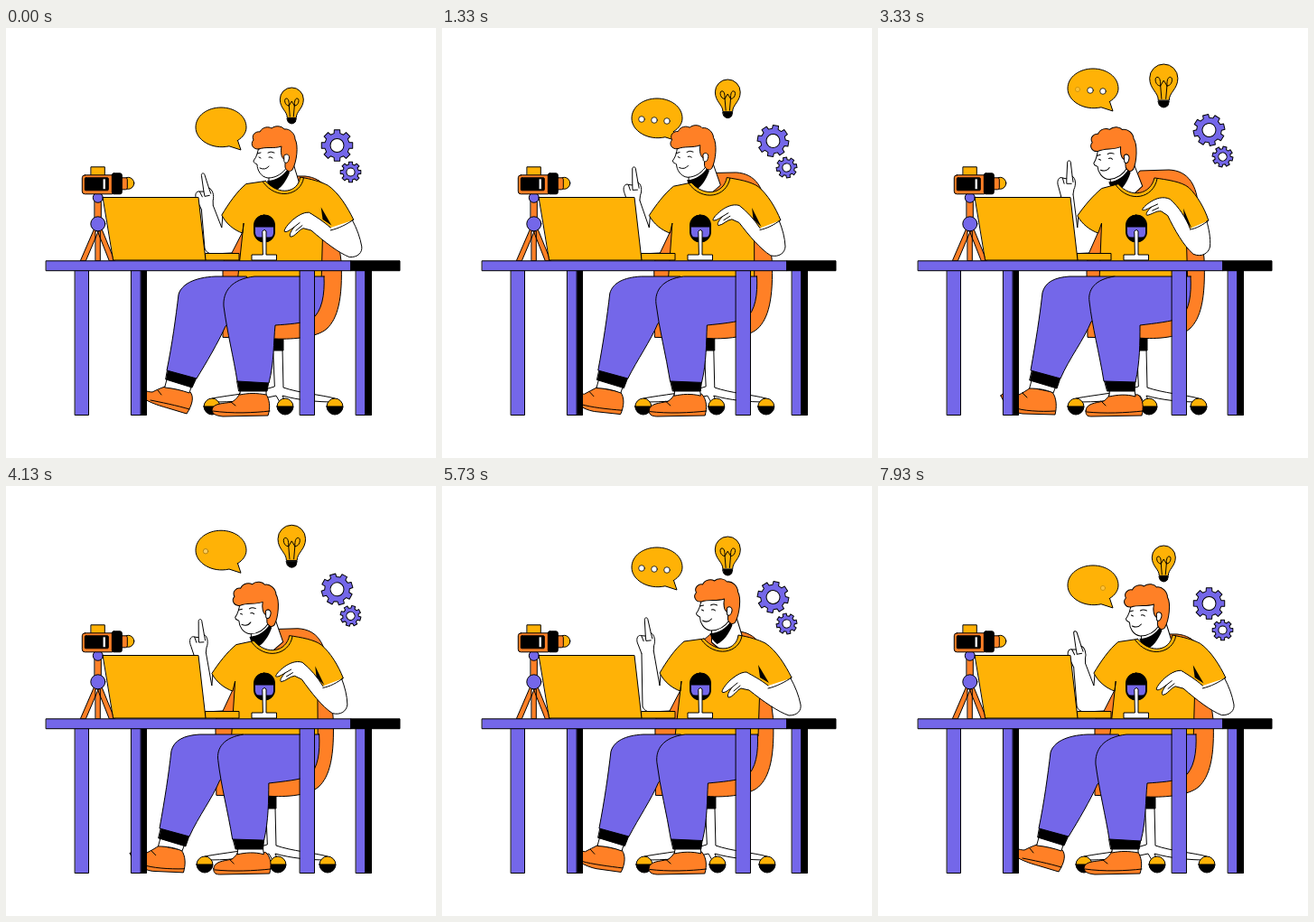
These frames come from a looping animation (476x476 px, 8.01 s). An HTML page:

```html
<!DOCTYPE html>
<html lang="en">
<head>
<meta charset="utf-8">
<title>Desk talk</title>
<style>
  html, body { margin: 0; width: 100%; height: 100%; overflow: hidden; background: #fff; }
  svg { display: block; width: 100vw; height: 100vh; }
  svg * { vector-effect: non-scaling-stroke; }
  .ink { stroke: #000; stroke-width: 1; stroke-linejoin: round; stroke-linecap: round; }
  .line { fill: none; }
  .purple { fill: #7467e9; }
  .orange { fill: #ff8026; }
  .yellow { fill: #ffb206; }
  .white { fill: #fff; }
  .black { fill: #000; }
  .dot { stroke-width: .8; }
</style>
</head>
<body>
<svg viewBox="0 0 476 476">
  <!-- floating icons -->
  <g id="bulb" class="ink">
    <path class="yellow" d="M-5 33 C-5 26 -13 23 -13 13 A13 13 0 0 1 13 13 C13 23 5 26 5 33Z"/>
    <path class="line" d="M-2 32 L-3 20 C-8 20 -9 12 -6 12 C-3 12 -3 17 -3 20 M2 32 L3 20 C8 20 9 12 6 12 C3 12 3 17 3 20 M-3 20 L0 15 L3 20"/>
    <path class="black" d="M-5 34 H5 L4 38 Q0 42 -4 38Z"/>
  </g>
  <g id="bubble" class="ink">
    <path class="yellow" d="M18.5 14.5 L22 25 L9 20.8 C-10 25 -28 14 -28 0 C-28 -13 -15 -22 0 -22 C15 -22 28 -13 28 0 C28 6 24 11 18.5 14.5Z"/>
    <circle class="white dot" cx="-17" cy="1" r="3.3"/>
    <circle class="white dot" cx="-3" cy="2" r="3.3"/>
    <circle class="white dot" cx="11" cy="3" r="3.3"/>
  </g>
  <g id="gearBig" class="ink"><path class="purple"/><circle class="white" r="7.5"/></g>
  <g id="gearSmall" class="ink"><path class="purple"/><circle class="white" r="4.6"/></g>

  <!-- chair -->
  <g id="chairBase" class="ink">
    <path class="white" d="M287 355 H297 L298 398 C315 404 340 406 355 410 V414 C335 414 315 412 297 407 L300 414 H294 L290 407 C265 413 240 414 219 414 V410 C240 406 268 404 288 397Z"/>
    <path class="black" d="M288 338 H298 V357 H288Z"/>
    <g id="wheels"></g>
  </g>
  <path class="ink orange" data-by="chair"
    data-a="M232 342 L231 270 C231 250 238 225 246 205 C252 188 276 176 290 158 L322 157 C344 158 353 174 355 200 L361 255 C363 300 357 322 345 333 C335 342 310 345 288 343Z"
    data-b="M240 342 L240 270 C240 255 247 232 256 212 C262 194 288 180 308 164 L331 164 C352 166 362 182 364 205 L371 258 C373 300 367 322 355 333 C345 342 320 345 298 344Z"/>

  <!-- person -->
  <g id="neck">
    <path class="ink white" d="M291 155 V179 L306 192 L326 176 L318 150Z"/>
    <path class="black" d="M289 169 C299 169 307 163 312 156 L314 160 C310 170 304 178 297 181 C293 178 290 174 289 169Z"/>
  </g>
  <path id="arm" class="ink white"/>
  <g id="hand" class="ink white">
    <path d="M5 40 L6 34 C9 28 8 20 4 18 L2 1 C2 -2 -2 -2 -2 1 L-3 21 L-8 20 C-12 18 -16 23 -13 31 L-10 42"/>
    <path class="line" d="M-8 20 L-6 27 M-3 21 V27 L3 27 M4 18 L5 25"/>
  </g>
  <path class="ink yellow" data-by="lean"
    data-a="M264 173 L246 178 C236 186 226 198 219 208 C224 217 233 224 242 227 L246 216 L244 277 L342 277 L340 218 L345 224 C352 222 358 218 364 213 C360 200 352 186 343 177 C335 170 318 168 304 166 C300 184 278 190 264 173Z"
    data-b="M290 169 L268 172 C258 180 248 195 241 207 C246 217 255 224 264 227 L265 216 L258 277 L350 277 L352 218 L361 224 C370 222 380 217 387 212 C380 198 370 182 358 174 C350 170 340 167 328 165 C326 182 305 186 290 169Z"/>
  <path class="ink line" data-by="lean"
    data-a="M261 174 C276 195 303 189 307 167"
    data-b="M287 170 C302 191 329 185 332 166"/>
  <path class="black" data-by="lean"
    data-a="M337 200 L346 222 L338 212Z"
    data-b="M350 198 L362 218 L352 212Z"/>
  <g class="ink white">
    <path data-by="lean"
      data-a="M344 222 C340 210 332 197 322 188 C314 184 306 187 301 190 C296 193 292 196 291 199 C293 200 297 198 301 196 C298 199 294 203 296 205 C302 204 306 200 312 201 L319 206 C326 222 335 240 346 250 C355 254 363 250 365 242 C366 232 364 222 362 214"
      data-b="M361 221 C352 214 344 210 337 206 C330 206 324 211 319 215 C314 220 310 225 310 228 C312 230 317 226 321 223 C318 227 315 232 317 234 C322 234 326 226 331 224 L340 226 C355 238 372 250 384 254 C394 254 398 248 397 242 C395 232 391 222 386 213"/>
    <path class="line" data-by="lean"
      data-a="M301 196 L308 193 M302 200 L309 197 M344 223 C351 222 358 218 364 213"
      data-b="M321 223 L327 218 M323 227 L330 221 M361 224 C370 222 380 217 387 212"/>
  </g>
  <g id="head" class="ink">
    <path class="white" d="M280 130 C279 137 278 142 274 147 C274 150 277 150 278 151 C278 157 282 165 290 166 C300 166 307 160 311 154 L316 140 L310 125Z"/>
    <path class="orange" d="M280 134 C273 135 270 128 274 124 C271 118 277 114 281 115 C284 109 291 109 294 111 C299 107 306 109 308 112 C314 111 320 117 320 123 C324 130 322 148 317 157 C314 160 310 158 309 154 V146 C304 144 304 136 305 131 C296 134 288 131 280 134Z"/>
    <path class="white" d="M308 141 C311 138 315 141 313 146 C312 150 309 150 308 148Z"/>
    <path class="line" d="M278 139 L282 138 M290 138 Q293 136 297 138 M280 143 L282 144 M291 143 Q293 142 295 144 M281 155 Q287 158 291 153"/>
  </g>

  <!-- legs and shoes -->
  <g class="ink">
    <path class="orange" data-by="chair"
      data-a="M136 407 C137 403 146 404 154 407 C160 404 165 401 169 398 L193 403 C198 410 198 420 196 428 L160 427 C148 426 139 415 136 407Z"
      data-b="M148 404 C150 399 156 403 162 403 C166 401 170 399 176 397 L204 403 C208 408 207 416 200 427 L180 421 C166 417 150 412 148 404Z"/>
    <path class="line" data-by="chair"
      data-a="M150 420 C160 424 180 425 196 424 M160 404 L165 409"
      data-b="M160 412 C170 414 190 418 203 422 M168 401 L172 406"/>
    <path class="white" data-by="chair"
      data-a="M171 388 L198 394 L194 404 C186 400 176 399 168 399Z"
      data-b="M179 387 L206 394 L203 404 C194 401 186 399 176 398Z"/>
    <path class="black" data-by="chair"
      data-a="M171 378 L202 387 L198 399 L168 390Z"
      data-b="M179 378 L211 387 L206 398 L177 389Z"/>
    <path class="purple" data-by="chair"
      data-a="M262 275 L212 275 C196 276 185 281 182 293 C179 320 175 345 169 379 L202 388 C212 365 228 345 236 325 L270 300Z"
      data-b="M266 275 L232 275 C208 276 194 284 191 295 C188 320 184 350 178 379 L211 388 C222 370 235 348 243 330 L275 300Z"/>
    <path class="orange" data-by="chair"
      data-a="M230 424 C230 416 240 415 250 413 C254 410 256 407 257 404 L288 406 C294 412 294 420 292 429 L236 430 C231 430 230 428 230 424Z"
      data-b="M228 422 C230 415 240 416 250 414 C255 411 257 408 259 404 L287 404 C292 411 293 420 290 429 L240 430 C231 429 228 427 228 422Z"/>
    <path class="line" data-by="chair"
      data-a="M231 425 C250 427 275 426 293 424 M247 413 L252 418"
      data-b="M229 424 C250 427 275 426 292 424 M249 414 L254 418"/>
    <path class="white" data-by="chair"
      data-a="M257 400 L284 400 L285 408 C275 405 265 406 256 408Z"
      data-b="M260 400 L288 400 L288 406 C278 404 268 404 259 406Z"/>
    <path class="black" data-by="chair"
      data-a="M251 391 L285 391 L284 402 L254 402Z"
      data-b="M256 391 L291 391 L289 402 L258 402Z"/>
    <path class="purple" data-by="chair"
      data-a="M346 275 L262 275 C240 278 232 290 234 303 C237 330 245 360 250 391 L285 392 C290 370 290 348 290 329 C306 327 325 325 335 321 C345 312 347 295 346 275Z"
      data-b="M352 275 L275 275 C249 278 240 292 241 308 C245 338 252 365 256 391 L291 393 C297 370 296 348 298 329 C312 328 328 327 338 323 C350 314 353 295 352 275Z"/>
  </g>

  <!-- tripod and camera -->
  <g class="ink" transform="translate(.3 .8)">
    <path class="orange" d="M98 184 H105 V212 H98Z M98 220 L82 257 H88 L102 224Z M105 220 L120 257 H114 L101 224Z M99 224 H104 V257 H99Z"/>
    <circle class="purple" cx="101.500" cy="187" r="5.500"/>
    <circle class="purple" cx="101.500" cy="216" r="8"/>
    <circle class="yellow" cx="135" cy="171" r="6.500"/>
    <rect class="orange" x="126" y="165" width="8" height="13" rx="2"/>
    <rect class="yellow" x="94" y="153" width="15" height="11"/>
    <rect class="orange" x="84" y="162" width="36" height="21" rx="3"/>
    <rect class="black" x="87" y="165" width="26" height="14" rx="1"/>
    <rect class="white" x="107" y="166" width="3" height="12"/>
    <rect class="black" x="117" y="160" width="11" height="23" rx="2"/>
  </g>

  <!-- laptop and microphone -->
  <g class="ink">
    <path class="yellow" d="M221 249.500 H258 V257 H221Z"/>
    <path class="yellow" d="M107.500 187.500 H213 L221 257 H119Z"/>
    <rect class="black" x="274.500" y="207" width="23" height="30" rx="11"/>
    <path class="purple" d="M275.500 220 H296.500 V227 Q296 232 292 232 H280 Q276 232 275.500 227Z"/>
    <path class="white" d="M284 225 Q286 222 288 225 V251 H299.500 V257 H272 V251 H284Z"/>
  </g>

  <!-- desk -->
  <g class="ink">
    <path class="purple" d="M76.500 268 H91.500 V428.500 H76.500Z M138.800 268 H155 V428.500 H138.800Z M325.500 268 H341.500 V428.500 H325.500Z M387.500 268 H404 V428.500 H387.500Z"/>
    <path class="black" d="M149.500 268 H155.500 V428.500 H149.500Z M398 268 H404.500 V428.500 H398Z"/>
    <path class="purple" d="M44.500 257.800 H382 V268.700 H44.500Z"/>
    <path class="black" d="M382 257.800 H436 V268.700 H382Z"/>
  </g>
</svg>
<script>
const LOOP = 8010;
const TIMES = [0, 1330, 2430, 3330, 4900, 5730];
const $ = id => document.getElementById(id);
const mix = (a, b, u) => a + (b - a) * u;
const clamp = x => Math.max(0, Math.min(1, x));
const mod = (a, n) => (a % n + n) % n;

// Smooth looping curve that never overshoots its keys.
function track(values, times = TIMES) {
  const n = values.length;
  const time = i => times[mod(i, n)] + LOOP * Math.floor(i / n);
  const value = i => values[mod(i, n)];
  const slope = i => (value(i + 1) - value(i)) / (time(i + 1) - time(i));
  const tangent = i => {
    const a = slope(i - 1), b = slope(i);
    return a * b <= 0 ? 0 : 2 * a * b / (a + b);
  };
  return t => {
    let i = n - 1;
    while (times[i] > t) i--;
    const h = time(i + 1) - time(i), u = (t - time(i)) / h, v = 1 - u;
    return v * v * (1 + 2 * u) * value(i) + u * v * v * h * tangent(i)
      + u * u * (3 - 2 * u) * value(i + 1) - u * u * v * h * tangent(i + 1);
  };
}

const tracks = {
  chair: track([1, .42, 0, 0, .3, .55]),
  lean: track([.9, .47, 0, .08, .78, 1]),
  headX: track([0, -18, -37, -34, -2.5, 7.5]),
  headY: track([0, -1, 4, 1, -5, -6]),
  tilt: track([0, -2, -4, -4, 0, 0]),
  tipX: track([218, 212.5, 211.5, 211.5, 220.5, 226]),
  tipY: track([162, 155, 146, 148, 149, 147]),
  wrist: track([-11, -3, 0, 0, -6, -6]),
  bubble: track([110, 100, 80, 67, 79, 90]),
  gear: track([130, 125, 117, 113, 117, 123]),
  spin: track([0, 10, 24, 32, 22, 12]),
  bulb: track([66, 57, 43, 40, 49, 56, 64], [...TIMES, 6830])
};

function gearPath(radius, root, teeth) {
  const step = 2 * Math.PI / teeth, points = [];
  for (let i = 0; i < teeth; i++) {
    for (const [r, f] of [[root, -.31], [radius, -.23], [radius, .23], [root, .31]]) {
      const a = (i + f) * step;
      points.push((r * Math.cos(a)).toFixed(2) + " " + (r * Math.sin(a)).toFixed(2));
    }
  }
  return "M" + points.join("L") + "Z";
}
$("gearBig").firstChild.setAttribute("d", gearPath(17.5, 13.8, 8));
$("gearSmall").firstChild.setAttribute("d", gearPath(11.5, 8.8, 8));

$("wheels").innerHTML = [219, 300, 355].map(x =>
  `<path class="yellow" d="M${x - 9} 419 A9 9 0 0 1 ${x + 9} 419Z"/>
   <path class="black" d="M${x - 9} 419 H${x + 9} A9 9 0 0 1 ${x - 9} 419Z"/>`).join("");

const NUMBER = /\d+(\.\d+)?/g;
const shapes = [...document.querySelectorAll("[data-by]")].map(el => ({
  el, by: el.dataset.by, from: el.dataset.a, to: el.dataset.b.match(NUMBER)
}));
const dots = [...document.querySelectorAll(".dot")];

function place(id, x, y, more = "") {
  $(id).setAttribute("transform", `translate(${x} ${y}) ${more}`);
}

function drawArm(p) {
  const size = .9;
  const a = p.wrist * Math.PI / 180, c = size * Math.cos(a), s = size * Math.sin(a);
  const turn = (x, y) => `${p.tipX + x * c - y * s} ${p.tipY + x * s + y * c}`;
  const elbow = mix(206, 226, p.lean);
  const sleeve = mix(220, 242, p.lean);
  $("arm").setAttribute("d", `M${turn(-10, 42)} L${elbow - 4} 244
    Q${elbow - 2} 250 ${elbow + 5} 250 L${elbow + 26} 249
    L${sleeve + 22} 226 L${sleeve} 209 L${sleeve - 1} 221 L${turn(5, 40)}`);
  place("hand", p.tipX, p.tipY, `rotate(${p.wrist}) scale(${size})`);
}

function draw(t) {
  const p = {};
  for (const name in tracks) p[name] = tracks[name](t);

  for (const { el, by, from, to } of shapes) {
    let i = 0;
    el.setAttribute("d", from.replace(NUMBER, n => mix(+n, +to[i++], p[by]).toFixed(2)));
  }
  place("chairBase", 9 * p.chair, 0);
  for (const id of ["neck", "head"]) place(id, p.headX, p.headY, `rotate(${p.tilt} 298 165)`);
  drawArm(p);

  place("bulb", 316.3, p.bulb, `scale(${mix(1, 1.2, (66 - p.bulb) / 26)})`);
  place("gearBig", 366.5, p.gear, `rotate(${p.spin})`);
  place("gearSmall", 381.5, p.gear + 29.5, `rotate(${-p.spin})`);
  place("bubble", 238, p.bubble);

  // The dots come and go one after another, twice per loop.
  const beat = t % (LOOP / 2);
  dots.forEach((dot, i) => {
    const shown = clamp((beat - 40 - 280 * i) / 250) * (1 - clamp((beat - 3130 - 300 * i) / 250));
    dot.style.opacity = shown;
    dot.setAttribute("r", mix(2.4, 3.3, shown));
  });
}

const start = performance.now();
function tick() {
  draw((performance.now() - start) % LOOP);
  requestAnimationFrame(tick);
}
tick();
</script>
</body>
</html>
```
